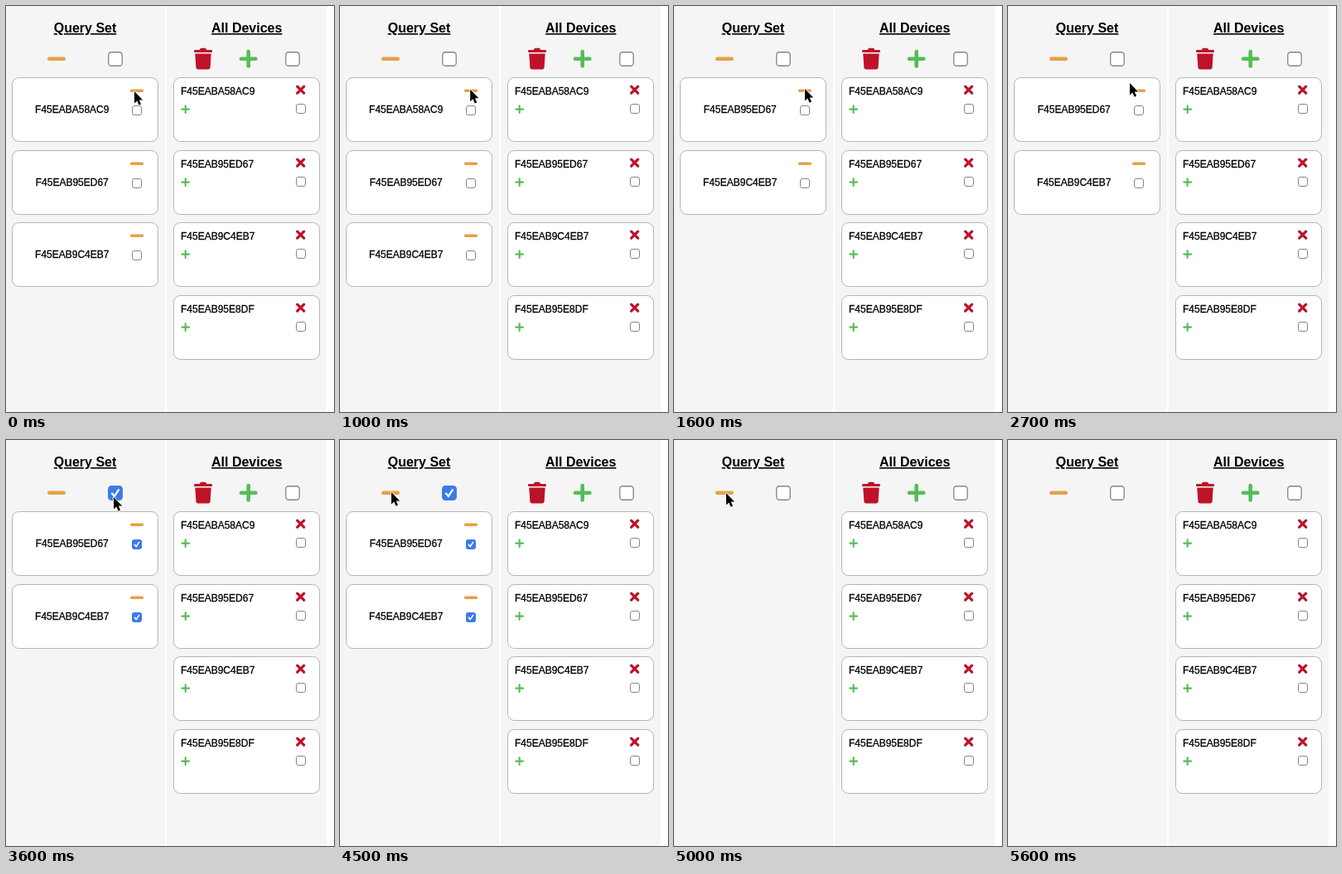
Recreate the animation shown at these times as an HTML page. Size 396 px wide and 490 px high, loop 6000 ms.

```html
<!DOCTYPE html>
<html lang="en">
<head>
<meta charset="utf-8">
<title>Device lists</title>
<style>
  html, body { margin: 0; width: 100%; height: 100%; overflow: hidden; background: #fff; }
  svg { display: block; }
  text { font: 12px "Liberation Sans", Arial, sans-serif; stroke: #000; stroke-width: .3px; }
  .title { font-size: 16px; font-weight: bold; text-decoration: underline; stroke: none; }
  .mid { text-anchor: middle; }
  .card { fill: #fff; stroke: #b4b4b4; }
  .box { fill: #fff; stroke: #858585; }
  .line { fill: none; stroke-linecap: round; }
  .on { visibility: hidden; }
  .checked > .on { visibility: visible; }
</style>
</head>
<body>
<svg id="stage" width="396" height="490" viewBox="0 0 396 490"></svg>
<script>
const LOOP = 6000, STEP = 100;
const ORANGE = '#e5a04a', GREEN = '#55bd56', RED = '#bd1329', BLUE = '#3b7bea';
const ids = ['F45EABA58AC9', 'F45EAB95ED67', 'F45EAB9C4EB7', 'F45EAB95E8DF'];
const rowY = i => Math.round(87.6 * i);

const line = (d, color, width) =>
  `<path class="line" d="${d}" stroke="${color}" stroke-width="${width}"/>`;
const minus = (x, y, r, w) => line(`M${x - r} ${y}h${2 * r}`, ORANGE, w);
const plus = (x, y, r, w) =>
  line(`M${x - r} ${y}h${2 * r}M${x} ${y - r}v${2 * r}`, GREEN, w);
const cross = (x, y, r) =>
  line(`M${x - r} ${y - r}l${2 * r} ${2 * r}m0 ${-2 * r}l${-2 * r} ${2 * r}`, RED, 3.3);

// Square checkbox centred on x, y with a hidden checked state
function check(x, y, size) {
  const h = size / 2, k = size / 12;
  const frame = `x="${x - h}" y="${y - h}" width="${size}" height="${size}" rx="${2.6 * k}"`;
  const tick = `M${x - 2.9 * k} ${y + .4 * k}l${2.1 * k} ${2.4 * k}l${3.7 * k} ${-5.6 * k}`;
  return `<g class="check"><rect class="box" ${frame} stroke-width="${size > 14 ? 1.3 : 1}"/>
    <g class="on"><rect ${frame} fill="${BLUE}" stroke="${BLUE}"/>${line(tick, '#fff', 1.7 * k)}</g></g>`;
}

const card = x => `<rect class="card" x="${x}" y="86.5" width="176" height="77" rx="8"/>`;

const queryCard = id => `<g class="query">${card(7.5)}
  <text class="mid" x="79.75" y="129">${id}</text>
  ${minus(158, 102.3, 6.4, 3.4)}${check(158, 126, 11)}</g>`;

const deviceCard = (id, i) => `<g transform="translate(0 ${rowY(i)})">${card(202.5)}
  <text x="211" y="107">${id}</text>
  ${cross(355.7, 101.2, 4)}${plus(216.7, 124.6, 4.4, 2.1)}${check(356, 124, 11)}</g>`;

const trash = `<g fill="${RED}">
  <path d="M228 53h5.6l1-1.6q.4-.6 1.200-.6h4.400q.8 0 1.200.6l1 1.600h5.600q.9 0 .9.900v1.500q0 .7-.9.700h-20q-.9 0-.9-.7v-1.500q0-.9.900-.900z"/>
  <path d="M228.300 57.600h19.400l-1.100 16.700q-.2 2.100-2.300 2.100h-12.600q-2.100 0-2.300-2.100z"/></g>`;

const stage = document.getElementById('stage');
stage.innerHTML = `
  <path d="M0 0h192v490h-192zM194 0h193v490h-193z" fill="#f5f5f5"/>
  <text class="title mid" x="95.5" y="32">Query Set</text>
  <text class="title mid" x="290.700" y="32">All Devices</text>
  ${minus(61, 63.700, 8.700, 4.600)}
  <g id="all">${check(132, 64, 16.500)}</g>
  ${trash}${plus(292.700, 63.800, 8.700, 4.600)}${check(346, 64, 16.500)}
  ${ids.slice(0, 3).map(queryCard).join('')}
  ${ids.map(deviceCard).join('')}
  <path id="cursor" d="M0 0v14.500l3.300-3.100 2.300 5.300 2.400-1.100-2.200-5.100h4.400z"
    fill="#000" stroke="#fff" stroke-width="1.600" stroke-linejoin="round" paint-order="stroke"/>`;

const cursor = document.getElementById('cursor');
const allCheck = document.querySelector('#all .check');
const cards = [...document.querySelectorAll('.query')];

// Pointer stops: time, x, y
const path = [
  [0, 155, 103], [800, 155, 103], [1100, 158, 100], [2600, 158, 100],
  [2700, 147, 93], [3200, 130, 69], [3800, 130, 69], [4500, 62, 63],
  [4600, 63, 64], [5300, 63, 64], [5400, 58, 42], [5500, 47, 8],
  [5600, 44, -30], [LOOP, 44, -30]
];

function pointerAt(t) {
  const i = path.findIndex(p => t < p[0]);
  const [t0, x0, y0] = path[i - 1], [t1, x1, y1] = path[i];
  const u = (t - t0) / (t1 - t0), e = u * u * (3 - 2 * u);
  return [x0 + (x1 - x0) * e, y0 + (y1 - y0) * e];
}

const fade = (t, start) =>
  Math.max(0, Math.min(1, 1 - (t - start + 15) / 315));

function draw(t) {
  const shift = t >= 1600 ? 1 : 0;
  cards.forEach((el, i) => {
    el.setAttribute('transform', `translate(0 ${rowY(Math.max(0, i - shift))})`);
    el.setAttribute('opacity', fade(t, i ? 4700 : 1300));
    el.querySelector('.check').classList.toggle('checked', i > 0 && t >= 3400);
  });
  allCheck.classList.toggle('checked', t >= 3400 && t < 4700);
  cursor.setAttribute('transform', `translate(${pointerAt(t)})`);
}

let start;
function tick(now) {
  start ??= now;
  draw(Math.floor((now - start) % LOOP / STEP) * STEP);
  requestAnimationFrame(tick);
}
draw(0);
requestAnimationFrame(tick);
</script>
</body>
</html>
```
